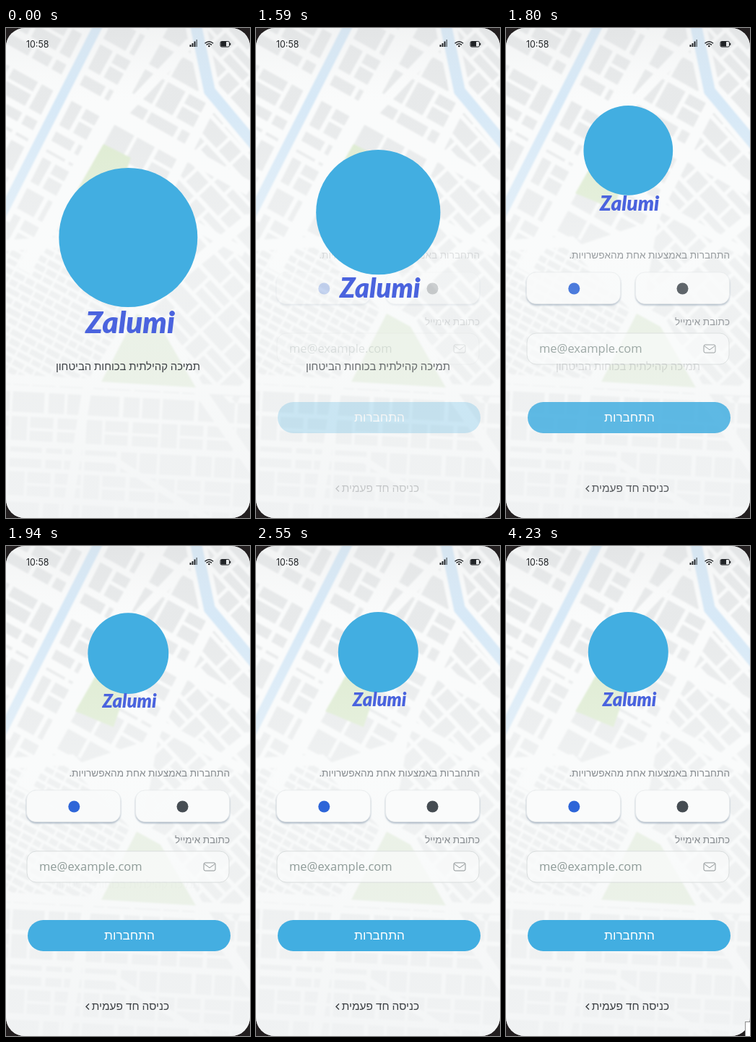
These frames come from a looping animation (338 px wide and 676 px high, 4260 ms). An HTML page:

```html
<!DOCTYPE html>
<html lang="he">
<head>
<meta charset="utf-8">
<title>Login splash</title>
<style>
  html, body { margin: 0; width: 100%; height: 100%; overflow: hidden; background: #231f20; }
  svg { display: block; width: 100vw; height: 100vh; }
  text { font-family: "Open Sans", "Liberation Sans", sans-serif; }
  .he { direction: rtl; }
  .mid { text-anchor: middle; }
</style>
</head>
<body>
<svg viewBox="0 0 338 676">
  <defs>
    <clipPath id="screen"><rect width="338" height="676" rx="26"/></clipPath>
    <filter id="soft"><feGaussianBlur stdDeviation="1"/></filter>
    <filter id="lift" x="-10%" y="-20%" width="120%" height="150%">
      <feDropShadow dx="0" dy="1.8" stdDeviation="1.1" flood-color="#8497ab" flood-opacity=".65"/>
    </filter>
    <linearGradient id="haze" x2="0" y2="1">
      <stop offset="0" stop-color="#dfe1e2" stop-opacity=".3"/>
      <stop offset=".15" stop-color="#f9fbfb" stop-opacity=".12"/>
      <stop offset=".45" stop-color="#f9fbfb" stop-opacity=".5"/>
      <stop offset=".7" stop-color="#f6f8f8" stop-opacity=".55"/>
      <stop offset="1" stop-color="#f2f4f5" stop-opacity=".82"/>
    </linearGradient>
    <pattern id="big" width="92" height="70" patternUnits="userSpaceOnUse" patternTransform="rotate(29) scale(1.25)">
      <path d="M2 3h34v25H2z M41 3h20v25H41z M66 3h24v25H66z M2 35h22v30H2z M29 35h31v12H29z M29 51h31v14H29z M65 35h25v30H65z"/>
    </pattern>
    <pattern id="fine" width="56" height="36" patternUnits="userSpaceOnUse" patternTransform="rotate(28)">
      <path d="M1 2h16v8H1z M20 2h12v8H20z M35 2h19v8H35z M1 14h11v8H1z M15 14h21v8H15z M39 14h15v8H39z M1 26h20v7H1z M24 26h13v7H24z M40 26h14v7H40z"/>
    </pattern>
    <pattern id="east" width="70" height="62" patternUnits="userSpaceOnUse" patternTransform="rotate(47)">
      <path d="M2 2h38v22H2z M45 2h22v22H45z M2 30h20v28H2z M27 30h40v11H27z M27 46h40v12H27z"/>
    </pattern>
    <pattern id="south" width="104" height="76" patternUnits="userSpaceOnUse" patternTransform="translate(8 497) rotate(3)">
      <path d="M2 4h44v28H2z M52 4h22v28H52z M78 4h24v28H78z M2 38h22v33H2z M28 38h32v15H28z M28 57h32v14H28z M66 38h36v15H66z M66 57h36v14H66z"/>
    </pattern>
  </defs>

  <g clip-path="url(#screen)">
    <rect width="338" height="676" fill="#fafbfb"/>
    <g filter="url(#soft)" fill="none">
      <g id="blocks"></g>
      <g id="roads" stroke="#fafbfb"></g>
      <path d="M130-8-8 262M262-8 282 87 346 163" stroke="#fafbfb" stroke-width="29"/>
      <g stroke="#d2e6f6">
        <path d="M130-8-8 262" stroke-width="13"/>
        <path d="M262-8 282 87 346 163" stroke-width="16"/>
      </g>
      <path d="M135 160 173 179 149 250 96 228Z" fill="#d8e8c8"/>
      <path d="M181 394 214 412 263 496 132 488Z" fill="#dde9d3"/>
    </g>
    <rect width="338" height="676" fill="url(#haze)"/>

    <g fill="#202326">
      <text x="28" y="27" font-size="12.400" style="font-family:Inter,sans-serif">10:58</text>
      <path d="M254.500 23h2v3h-2z M257.500 21h2v5h-2z M260.500 18.500h2v7.500h-2z"/>
      <path d="M263.500 16h1.500v10h-1.500z" opacity=".6"/>
      <path d="M275.500 21.200q5.800-5 11.600 0M277.600 23.300q3.700-3 7.400 0" fill="none" stroke="#202326" stroke-width="1.500"/>
      <circle cx="281.300" cy="25" r="1.300"/>
      <rect x="297" y="18.500" width="12.500" height="7.500" rx="1.800" fill="none" stroke="#202326"/>
      <path d="M297.500 19h7.500v6.500h-7.500z M310 20.700h1.300v3H310z"/>
    </g>

    <g id="form">
      <text class="he" x="310" y="318" font-size="13.600" fill="#858a8e">התחברות באמצעות אחת מהאפשרויות.</text>
      <g fill="#fafbfb" stroke="#e6e9ea" stroke-width=".7" filter="url(#lift)">
        <rect x="28.500" y="337" width="130" height="43.500" rx="13"/>
        <rect x="179.500" y="337" width="130" height="43.500" rx="13"/>
      </g>
      <circle cx="94.300" cy="359.500" r="8" fill="#2d65d8"/>
      <circle cx="244.500" cy="359.500" r="8" fill="#454c52"/>
      <text class="he" x="310" y="410" font-size="13.500" fill="#858a8e">כתובת אימייל</text>
      <rect x="29" y="421" width="280" height="43" rx="13" fill="#fafbfb" fill-opacity=".75" stroke="#d9dddd"/>
      <text x="46" y="448" font-size="16.500" fill="#8e9b98">me@example.com</text>
      <path d="M276 437h12q2 0 2 2v7q0 2-2 2h-12q-2 0-2-2v-7q0-2 2-2zM274.500 438.500l7.500 5.500 7.500-5.500" fill="none" stroke="#8c9294"/>
      <rect x="30" y="516" width="281" height="43" rx="21.500" fill="#42aee1"/>
      <text class="he mid" x="171" y="543" font-size="17.200" font-weight="500" fill="#fff">התחברות</text>
      <text class="he" x="226" y="640" font-size="15.400" fill="#3b3f43">כניסה חד פעמית</text>
      <path d="M115 631.500 111 635.500 115 639.500" fill="none" stroke="#3b3f43" stroke-width="1.400"/>
    </g>

    <text id="tag" class="he mid" x="169" y="472" font-size="14.850" fill="#3b3f44">תמיכה קהילתית בכוחות הביטחון</text>
    <circle id="badge" cx="169.300" fill="#42aee1"/>
    <text id="brand" class="mid" font-size="42" font-weight="900" font-style="italic" fill="#4a63de" style="font-family:Lato,sans-serif">Zalumi</text>
  </g>
  <rect id="hint" y="656.500" width="20" height="24" fill="#fff" stroke="#8d8d8d"/>
</svg>
<script>
const $ = id => document.getElementById(id);
const set = (el, attrs) => { for (const k in attrs) el.setAttribute(k, attrs[k]); };
const add = (parent, attrs) => {
  const el = document.createElementNS("http://www.w3.org/2000/svg", "path");
  set(el, attrs);
  parent.append(el);
};

// Map: districts of building blocks, then the main streets over them
document.querySelectorAll("pattern path").forEach(p => p.setAttribute("fill", "#e5e7e8"));
[
  ["big", "M0 0H270L284 90 190 270 100 300 0 300Z"],
  ["east", "M270 0H338V480L300 560 190 385 210 270 284 95Z"],
  ["fine", "M0 300 100 290 180 385 115 488 0 484Z"],
  ["south", "M0 490 338 502V676H0Z"]
].forEach(([id, d]) => add($("blocks"), { d, fill: `url(#${id})` }));
[
  [20, "M-5 30 165 125 338 222"],
  [20, "M215-8 125 150 25 335"],
  [13, "M-5 125 120 195 330 310"],
  [14, "M150 130 255 20M290 95 190 290"],
  [15, "M-5 300 90 295 182 388 338 262"],
  [13, "M-5 484 338 501"],
  [13, "M182 388 112 500 82 684"],
  [16, "M182 388 214 405 268 500 346 612"],
  [9, "M-5 588 150 596 290 684"]
].forEach(([w, d]) => add($("roads"), { d, "stroke-width": w }));

const PERIOD = 4260, START = 1530, STEP = 70;
const mix = (a, b, p) => a + (b - a) * p;

// Underdamped spring, advanced in steps of 70 ms
function spring(t) {
  if (t < START) return 0;
  if (t >= 2550) return 1;
  const s = (Math.floor((t - START + 10) / STEP) * STEP + 38) / 1000;
  const decay = 6.4, freq = 5.1;
  return 1 - Math.exp(-decay * s) * (Math.cos(freq * s) + decay / freq * Math.sin(freq * s));
}

function draw() {
  const t = performance.now() % PERIOD;
  const p = spring(t), fade = Math.min(p, 1);
  const r = mix(96, 55.5, p);
  set($("badge"), { r, cy: mix(193, 91, p) + r });
  set($("brand"), {
    transform: `translate(${mix(172, 171, p)} ${mix(421, 221, p)}) scale(${mix(1, .605, p)})`
  });
  set($("form"), { opacity: fade });
  set($("tag"), { opacity: 1 - fade });
  set($("hint"), { x: t < 4230 ? 325.5 : 331.5, visibility: t < 4140 ? "hidden" : "visible" });
  requestAnimationFrame(draw);
}
draw();
</script>
</body>
</html>
```
